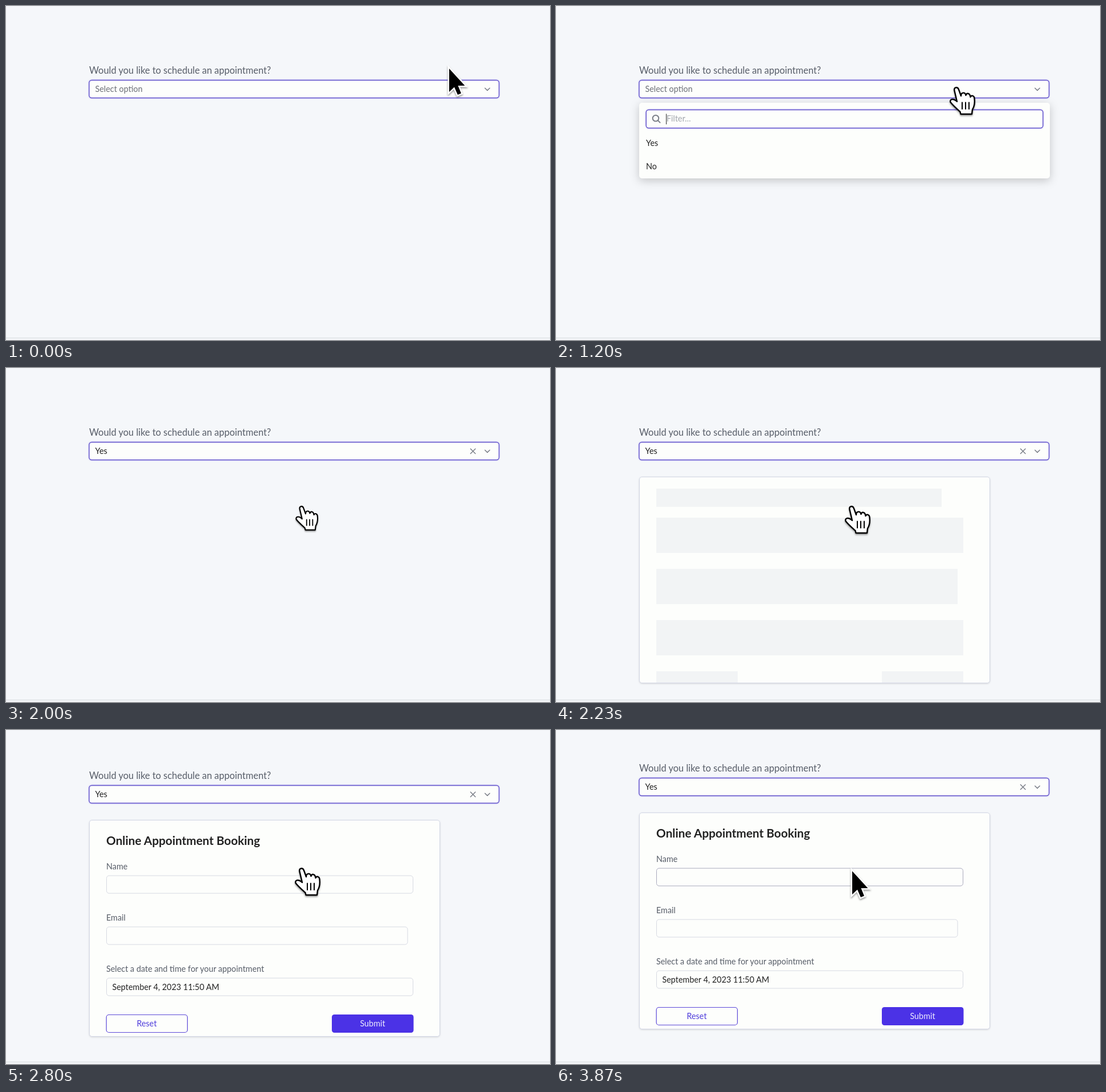
Animation, 955 px wide and 587 px high, one loop 3910 ms. Source, as an HTML page:

```html
<!DOCTYPE html>
<html lang="en">
<head>
<meta charset="utf-8">
<title>Appointment form</title>
<style>
html, body { margin: 0; width: 100%; height: 100%; overflow: hidden; background: #f5f7fa; }
svg { display: block; font: 14.4px Lato, Nunito, sans-serif; fill: #222; }
.label { fill: #575d68; }
.hint { fill: #6c7078; }
.field { fill: #fdfefc; stroke: #d6d9e2; }
.focus { fill: #fdfefc; stroke: #6455cb; stroke-width: 1.4; filter: drop-shadow(0 0 1px #a79cf0); }
.icon { fill: none; stroke: #7b7f88; stroke-width: 1.5; stroke-linecap: round; stroke-linejoin: round; }
.panel { fill: #fdfefc; }
.bar { fill: #f2f4f5; }
.shade { filter: drop-shadow(0 2px 1.5px #0006); }
</style>
</head>
<body>
<svg width="955" height="587" viewBox="0 0 955 587">
  <defs>
    <filter id="blur" x="-50%" y="-50%" width="200%" height="200%">
      <feGaussianBlur id="smear" stdDeviation="0"/>
    </filter>
  </defs>
  <path d="M0 583.5H955" stroke="#d6d9dc"/>

  <g id="page">
    <text class="label" x="146" y="118.5" font-size="16.45">Would you like to schedule an appointment?</text>
    <rect class="focus" x="146" y="130.5" width="719.5" height="31" rx="4.5"/>
    <text id="value" x="156.5" y="151"></text>
    <path id="clear" class="icon" d="M815.5 142l8.5 8.5m0-8.5l-8.5 8.5"/>
    <path class="icon" d="M840.8 144.2l4.2 4.2 4.2-4.2"/>

    <g id="card">
      <rect id="frame" class="field" x="146.5" y="191.5" width="615" rx="4.5"
        style="stroke:#d3d7e6;filter:drop-shadow(0 1px 1.5px #0002)"/>
      <g id="skeleton" class="bar">
        <path d="M176 212h501v32h-501zm0 51h539v62h-539zm0 90h529v62h-529zm0 90h539v62h-539zm0 90h143v20h-143zm396 0h143v20h-143z"/>
      </g>
      <g id="form">
        <text x="176" y="235" font-size="20.8" font-weight="700">Online Appointment Booking</text>
        <text class="label" x="176" y="278">Name</text>
        <rect id="name" class="field" x="176.5" y="289" width="538" height="31" rx="4.5"/>
        <text class="label" x="176" y="368">Email</text>
        <rect class="field" x="176.5" y="379" width="528.5" height="31" rx="4.5"/>
        <text class="label" x="176" y="458">Select a date and time for your appointment</text>
        <rect class="field" x="176.5" y="469" width="538" height="31" rx="4.5"/>
        <text x="186.5" y="490">September 4, 2023 11:50 AM</text>
        <rect x="176.2" y="533.5" width="142.3" height="31" rx="4.5" fill="#fdfefc" stroke="#5b48d8" stroke-width="1.2"/>
        <text x="247" y="554" text-anchor="middle" fill="#4f3ddb">Reset</text>
        <rect x="572" y="533" width="143.5" height="32" rx="4.5" fill="#4b32e6"/>
        <text x="643.5" y="554" text-anchor="middle" fill="#eeecfd">Submit</text>
      </g>
    </g>

    <g id="menu">
      <rect class="panel" x="146" y="170" width="721" height="133" rx="5" style="filter:drop-shadow(0 4px 8px #0003)"/>
      <rect class="focus" x="158.3" y="182.5" width="696.5" height="32" rx="4.5"/>
      <g class="icon" style="stroke-width:2"><circle cx="175" cy="197.3" r="5.3"/><path d="M179 201.3l3.6 3.6"/></g>
      <text x="194" y="203" fill="#a3a7ae">Filter...</text>
      <path d="M193.7 189.5V208" stroke="#222"/>
      <path id="hover" d="M146 223h721v38H146z" fill="#dcdcdb"/>
      <text x="158" y="246">Yes</text>
      <text x="158" y="286.5">No</text>
    </g>
  </g>

  <g id="cursor" filter="url(#blur)">
    <g class="shade">
      <path id="arrow" d="M2 5V46L11 37.5 17 51 23 48.5 17.5 35H29.5Z"
        fill="#000" stroke="#fff" stroke-width="5" paint-order="stroke"/>
      <g id="hand" fill="#fff" stroke="#000" stroke-width="2.4" stroke-linejoin="round" stroke-linecap="round">
        <path d="M2 25L-2.5 6C-4-.5 3-2 5 4L9 15C9 8.5 16 7.500 17.500 14 19 9 24.500 10 25.500 17 27 13 32.500 14.500 32.500 20 33.500 28 32 34 29 39L28 47H8.500L7.500 43C1 37-5 32-9.500 26-11 20-4 19 2 25Z"/>
        <path d="M11 26.500V38M17 26.500V38M23 26.500V38" stroke-width="2"/>
      </g>
    </g>
  </g>
</svg>
<script>
const LOOP = 3910;
const OPEN = 1070, PICK = 1940, CARD = 2070, LOADED = 2500, LEAVE = 3500;
const $ = id => document.getElementById(id);
const show = (id, on) => $(id).style.display = on ? '' : 'none';
const clamp = u => Math.max(0, Math.min(1, u));
const ease = u => u < .5 ? 4 * u ** 3 : 1 - 4 * (1 - u) ** 3;
const ramp = (t, from, to) => ease(clamp((t - from) / (to - from)));

function pointer(t) {
  const a = ramp(t, 130, 700), b = ramp(t, 1300, 1815);
  return [776 - 74 * a - 184 * b, 105 + 38 * a + 100 * b];
}

// Cursor shrink around a click
const press = (t, at) => clamp(Math.min((t - at + 110) / 100, (at + 130 - t) / 120));

function draw(t) {
  const [x, y] = pointer(t), [px, py] = pointer(t - 4);
  const picked = t >= PICK, loaded = t >= LOADED;
  const onLink = y >= 130 && t < LEAVE;

  $('page').setAttribute('transform', `translate(0 ${-Math.round(46 * ramp(t, 2565, 2965))})`);
  $('value').textContent = picked ? 'Yes' : 'Select option';
  $('value').setAttribute('class', picked ? '' : 'hint');
  show('clear', picked);

  show('menu', t >= OPEN && !picked);
  $('menu').style.opacity = clamp((t - OPEN) / 100);
  show('hover', y >= 223);

  show('card', t >= CARD);
  $('frame').setAttribute('height', loaded ? 380 : 362);
  show('skeleton', !loaded);
  show('form', loaded);
  $('name').style.stroke = t >= LEAVE ? '#a9a9bd' : '';

  const scale = 1 - .2 * Math.max(press(t, 870), press(t, PICK));
  $('cursor').setAttribute('transform', `translate(${x} ${y}) scale(${scale})`);
  $('smear').setAttribute('stdDeviation', `${Math.abs(x - px) * .8} ${Math.abs(y - py) * .8}`);
  show('arrow', !onLink);
  show('hand', onLink);
}

const start = performance.now();
function tick() {
  draw((performance.now() - start) % LOOP);
  requestAnimationFrame(tick);
}
tick();
</script>
</body>
</html>
```
